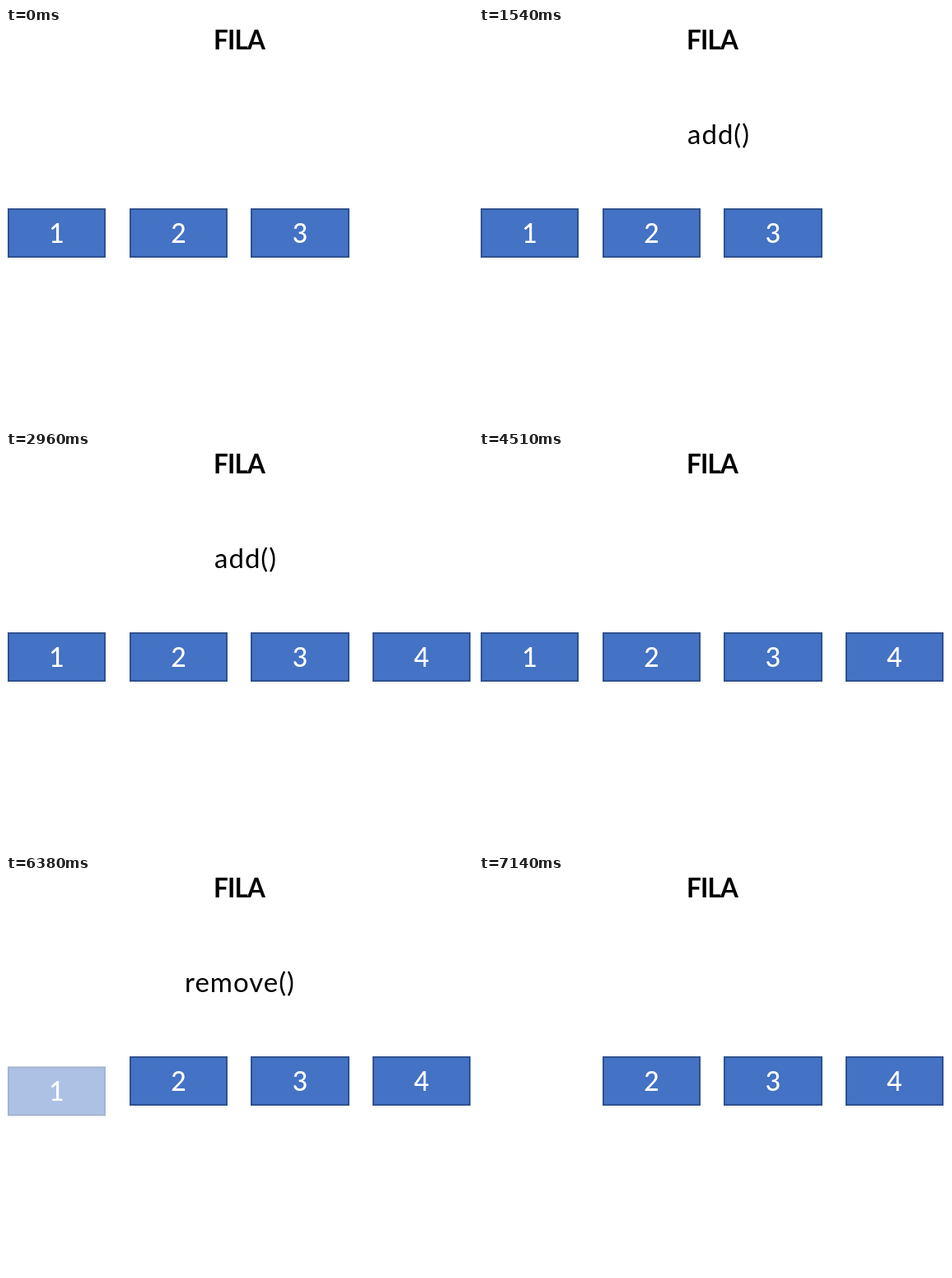
Recreate the animation shown at these times as an HTML page. Size 567 by 481 pixels, loop 8.09 s.

```html
<!DOCTYPE html>
<html lang="pt">
<head>
<meta charset="utf-8">
<title>Fila</title>
<style>
  html, body { margin: 0; width: 100%; height: 100%; overflow: hidden; background: #fff; }
  svg { display: block; }
  text { font: 33px Lato, "Open Sans", sans-serif; text-anchor: middle; letter-spacing: 1px; }
  .title { font-size: 31.5px; font-weight: 700; letter-spacing: -.8px; }
  rect { fill: #4472c4; stroke: #2f528f; stroke-width: 2; }
  g text { fill: #fff; font-size: 32px; font-weight: 500; letter-spacing: 0; }
</style>
</head>
<body>
<svg id="stage" width="567" height="481" viewBox="0 0 567 481">
  <text class="title" x="283" y="26">FILA</text>
  <text id="add" x="291" y="141">add()</text>
  <text id="remove" x="284" y="141">remove()</text>
</svg>
<script>
const LOOP = 8090;
const HOLD = 156;      // time each pose is held
const LEAD = 38;       // shift of the pose grid
const DURATION = 467;  // length of every transition
const REST = 219;      // top of the row of boxes

const stage = document.getElementById('stage');
const add = document.getElementById('add');
const remove = document.getElementById('remove');

const boxes = [1, 2, 3, 4].map((label, i) => {
  const left = Math.round(2 + i * 147.6);
  const right = Math.round(121.4 + i * 147.6);
  const g = document.createElementNS('http://www.w3.org/2000/svg', 'g');
  g.innerHTML = `<rect x="${left + 1}" y="1" width="${right - left - 2}" height="58"/>
    <text x="${(left + right) / 2}" y="42">${label}</text>`;
  stage.append(g);
  place(g, REST);
  return g;
});

function place(box, y) {
  box.setAttribute('transform', `translate(0 ${y})`);
}

function fade(el, opacity) {
  el.setAttribute('opacity', opacity);
}

// Progress from 0 to 1 of a transition
function ramp(t, start) {
  return Math.min(1, Math.max(0, (t - start) / DURATION));
}

function draw(time) {
  const t = Math.floor((time % LOOP + LEAD) / HOLD) * HOLD - LEAD;

  fade(add, ramp(t, 1030) - ramp(t, 3995));
  fade(remove, ramp(t, 4955) - ramp(t, 6620));

  // The last box drops in from above at constant speed
  place(boxes[3], REST - 458 * (1 - ramp(t, 2202)));

  // The first box sinks faster and faster while it fades
  const exit = ramp(t, 6092);
  place(boxes[0], REST + 44 * exit ** 2.25);
  fade(boxes[0], 1 - exit);
}

const begin = performance.now();
function tick() {
  draw(performance.now() - begin);
  requestAnimationFrame(tick);
}
tick();
</script>
</body>
</html>
```
